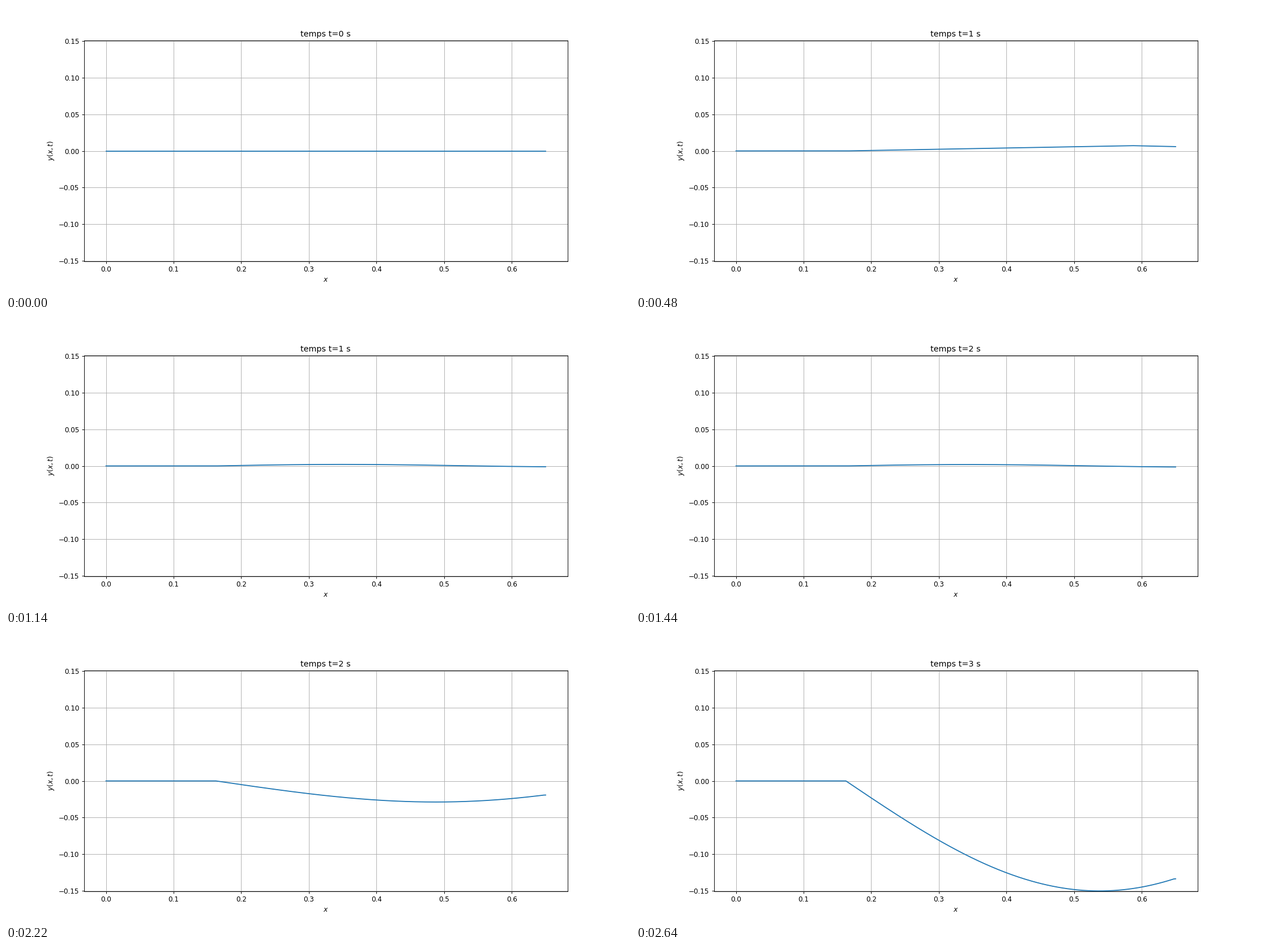
Write a matplotlib script that moves like this. It is 1102 by 508 pixels and loops after 2.7 s.

```python
import numpy as np
import matplotlib.pyplot as plt
from matplotlib.animation import FuncAnimation

FRAMES, INTERVAL = 45, 60
LENGTH, FINGER, PLUCK = 0.65, 0.1625, 0.587
RELEASE = 15                    # step at which the string is let go
TURN = 2 * np.pi * 3 / 7        # phase advance of the vibration per step

x = np.linspace(0, LENGTH, 261)
s = np.clip(x, FINGER, LENGTH - 0.002) - FINGER


def plucked(height):
    """Triangle pulled up at the pluck point, with a yielding right end."""
    return np.interp(x, [0, FINGER, PLUCK, LENGTH],
                     [0, 0, height, 0.82 * height])


def envelope(step):
    """Amplitude that dies out after the release, then grows without bound."""
    keys = [RELEASE, 24, 31, 37, 44]
    sizes = [0.0134, 0.0003, 0.0139, 0.0293, 0.15]
    return np.exp(np.interp(step, keys, np.log(sizes)))


def vibrating(step):
    """Main bow with a slowly drifting crest, over a small steady ripple."""
    wave = 4.7 + 0.45 * np.cos(2 * np.pi * (step - 37.5) / 13)
    bow = -envelope(step) * np.cos(TURN * (step - 37))
    return bow * np.sin(wave * s) + 0.0017 * np.sin(9 * s)


def displacement(step):
    return plucked(0.0009 * step) if step <= RELEASE else vibrating(step)


fig, ax = plt.subplots(figsize=(12.814, 5.907), dpi=86)
line, = ax.plot(x, np.zeros_like(x))
ax.set_ylim(-0.151, 0.151)
ax.set_xlabel("$x$")
ax.set_ylabel("$y(x,t)$")
ax.grid(True)
title = ax.set_title("temps t=0 s")


def update(step):
    line.set_ydata(displacement(step))
    title.set_text(f"temps t={step / 15:.0f} s")
    return line, title


anim = FuncAnimation(fig, update, frames=FRAMES, interval=INTERVAL,
                     repeat=True, repeat_delay=0)
plt.show()
```
